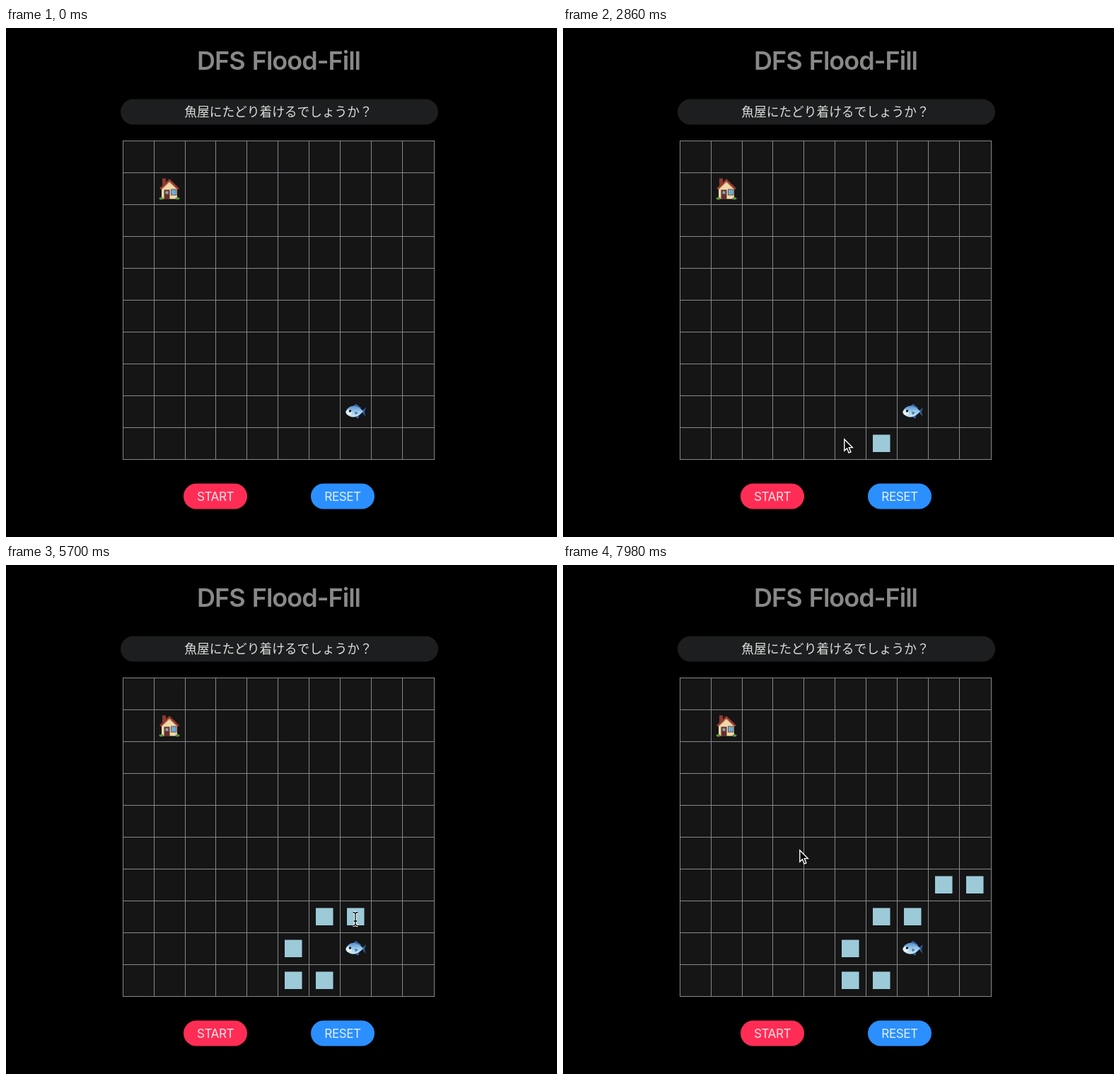
These frames come from a looping animation (779x719 px, 8000 ms). An HTML page with a canvas:

```html
<!DOCTYPE html>
<html lang="ja">
<head>
<meta charset="utf-8">
<title>DFS Flood-Fill</title>
<style>
  html, body { margin: 0; width: 100%; height: 100%; overflow: hidden; background: #000; }
  canvas { display: block; }
</style>
</head>
<body>
<canvas id="stage" width="779" height="719"></canvas>
<script>
const ctx = document.getElementById('stage').getContext('2d');
const LOOP = 8000;
const CELLS = 10;
const WALL = 24.5;
const LATIN = 'Inter, "Open Sans", sans-serif';
const JAPANESE = '"Noto Sans CJK JP", "Noto Sans CJK", sans-serif';

// the last column is slightly wider
const lineX = i => Math.round(164.9 + 43.85 * i) + (i === CELLS ? 2 : 0);
const lineY = i => 159 + 45 * i;

// where the pointer rests: arrival time, x, y
const stops = [
  [0, 436, 722], [1080, 442, 591], [1780, 449, 590], [2820, 397, 580], [3440, 424, 547],
  [4500, 452, 504], [5400, 494, 500], [6220, 527, 457], [7050, 583, 455], [7970, 334, 402]
];
const REST = 420;
const CLICK = 180;

// each rest between the lead-in and the exit puts a wall into the cell under the pointer
const walls = stops.slice(2, -1).map(([time, x, y]) => ({
  time: time + CLICK,
  x: lineX(Math.floor((x - lineX(0)) / 44)) + 10,
  y: lineY(Math.floor((y - lineY(0)) / 45)) + 10.5
}));

function pointerAt(t) {
  const i = stops.findLastIndex(s => s[0] <= t);
  const [t0, x0, y0] = stops[i];
  const [t1, x1, y1] = stops[i + 1] || stops[i];
  const u = t1 > t0 ? Math.max(0, (t - t0 - REST) / (t1 - t0 - REST)) : 0;
  const k = u * u * (3 - 2 * u);
  return { x: x0 + (x1 - x0) * k, y: y0 + (y1 - y0) * k };
}

function rect(color, x, y, w, h) {
  ctx.fillStyle = color;
  ctx.fillRect(x, y, w, h);
}

function poly(color, ...points) {
  ctx.fillStyle = color;
  ctx.beginPath();
  for (let i = 0; i < points.length; i += 2) ctx.lineTo(points[i], points[i + 1]);
  ctx.closePath();
  ctx.fill();
}

function oval(color, x, y, rx, ry = rx) {
  ctx.fillStyle = color;
  ctx.beginPath();
  ctx.ellipse(x, y, rx, ry, 0, 0, Math.PI * 2);
  ctx.fill();
}

function pill(color, x, y, w) {
  ctx.fillStyle = color;
  ctx.beginPath();
  ctx.roundRect(x, y, w, 36, 18);
  ctx.fill();
}

function label(text, x, y, font, color, spacing = '0px', wordGap = '0px') {
  ctx.font = font;
  ctx.letterSpacing = spacing;
  ctx.wordSpacing = wordGap;
  ctx.textAlign = 'center';
  ctx.fillStyle = color;
  ctx.fillText(text, x, y);
}

function button(text, color, ink, x) {
  pill(color, x, 643.5, 90);
  label(text, x + 45, 668, `400 17.2px ${LATIN}`, ink, '-0.03em');
}

function at(x, y, paint) {
  ctx.save();
  ctx.translate(x, y);
  paint();
  ctx.restore();
}

function house() {
  rect('#8f3a2f', -10, -15, 5, 11);
  poly('#f0d8ab', -11, -1, 0, -12, 11, -1, 11, 14, -11, 14);
  poly('#c9a878', -11, -1, 0, -11, 11, -1, 11, 1, 0, -9, -11, 1);
  poly('#96392d', 0, -14.5, 14, -1, 12, 1, 0, -10.8, -12, 1, -14, -1);
  rect('#65302a', -7.5, 1, 8, 13.5);
  rect('#7fa9bd', -5.5, 3, 4, 4);
  rect('#80533c', 2, 0, 8.5, 9);
  rect('#68addb', 3, 1, 6.5, 7);
  for (const s of [-1, 1]) oval('#5b963a', 11.5 * s, 13.2, 3, 1.8);
}

function fish() {
  poly('#35639a', -4, -7, 1, -10.5, 8, -5, 4, 0);
  poly('#35639a', -3, 6, 4, 10.5, 6, 4);
  poly('#2d5b94', 8, 0, 15, -5.5, 13, 1, 14.5, 7.5);
  const skin = ctx.createLinearGradient(0, -9, 0, 9);
  skin.addColorStop(0, '#4c86c4');
  skin.addColorStop(0.5, '#98c8ec');
  skin.addColorStop(1, '#d8ebf7');
  ctx.fillStyle = skin;
  ctx.beginPath();
  ctx.moveTo(-14, 1);
  ctx.bezierCurveTo(-9, -11, 3, -10, 11, 0);
  ctx.bezierCurveTo(3, 10, -9, 11, -14, 1);
  ctx.fill();
  oval('#e4f0f7', -9, 1.5, 4);
  oval('#10161f', -7.5, -0.5, 1.8);
  poly('#4779b0', -1, 0, 4, 2, 0, 5);
}

function arrow() {
  ctx.beginPath();
  [[0.8, 1], [0.8, 17.2], [4.5, 13.7], [7.1, 20], [9.9, 18.8], [7.3, 12.6], [12.3, 12.6]]
    .forEach(([x, y]) => ctx.lineTo(x, y));
  ctx.closePath();
  ctx.fillStyle = '#000';
  ctx.fill();
  ctx.strokeStyle = '#fff';
  ctx.lineWidth = 1.4;
  ctx.stroke();
}

function beam() {
  ctx.beginPath();
  for (const s of [-1, 1]) {
    ctx.moveTo(-3.5, 9.5 * s);
    ctx.quadraticCurveTo(0, 9.5 * s, 0, 6.5 * s);
    ctx.quadraticCurveTo(0, 9.5 * s, 3.5, 9.5 * s);
  }
  ctx.moveTo(0, -7);
  ctx.lineTo(0, 7);
  ctx.moveTo(-2.2, 3);
  ctx.lineTo(2.2, 3);
  for (const [color, width] of [['#fff', 3.4], ['#000', 1.3]]) {
    ctx.strokeStyle = color;
    ctx.lineWidth = width;
    ctx.stroke();
  }
}

function grid() {
  const left = lineX(0), top = lineY(0);
  const w = lineX(CELLS) - left + 1, h = lineY(CELLS) - top + 1;
  rect('#151516', left, top, w, h);
  for (let i = 0; i <= CELLS; i++) {
    rect('#87878a', lineX(i), top, 1, h);
    rect('#87878a', left, lineY(i), w, 1);
  }
}

function draw(t) {
  rect('#000', 0, 0, 779, 719);
  label('DFS Flood-Fill', 385.5, 59, `600 36px ${LATIN}`, '#888886', '-0.027em', '2px');
  pill('#1c1e1f', 162, 100.5, 449);
  label('魚屋にたどり着けるでしょうか？', 385, 125, `400 17.7px ${JAPANESE}`, '#dededd');
  grid();
  at(231, 227.5, house);
  at(494, 541.5, fish);

  const shown = walls.filter(w => t >= w.time);
  for (const w of shown) rect('#9dcad8', w.x, w.y, WALL, WALL);

  button('START', '#ff2d55', '#ffe3e8', 251);
  button('RESET', '#2b8fff', '#e3f0ff', 431);

  const p = pointerAt(t);
  const inside = d => d >= 0 && d <= WALL;
  const overWall = shown.some(w => inside(p.x - w.x) && inside(p.y - w.y));
  at(p.x, p.y, overWall ? beam : arrow);
}

const start = performance.now();
function frame() {
  draw((performance.now() - start) % LOOP);
  requestAnimationFrame(frame);
}
frame();
</script>
</body>
</html>
```
